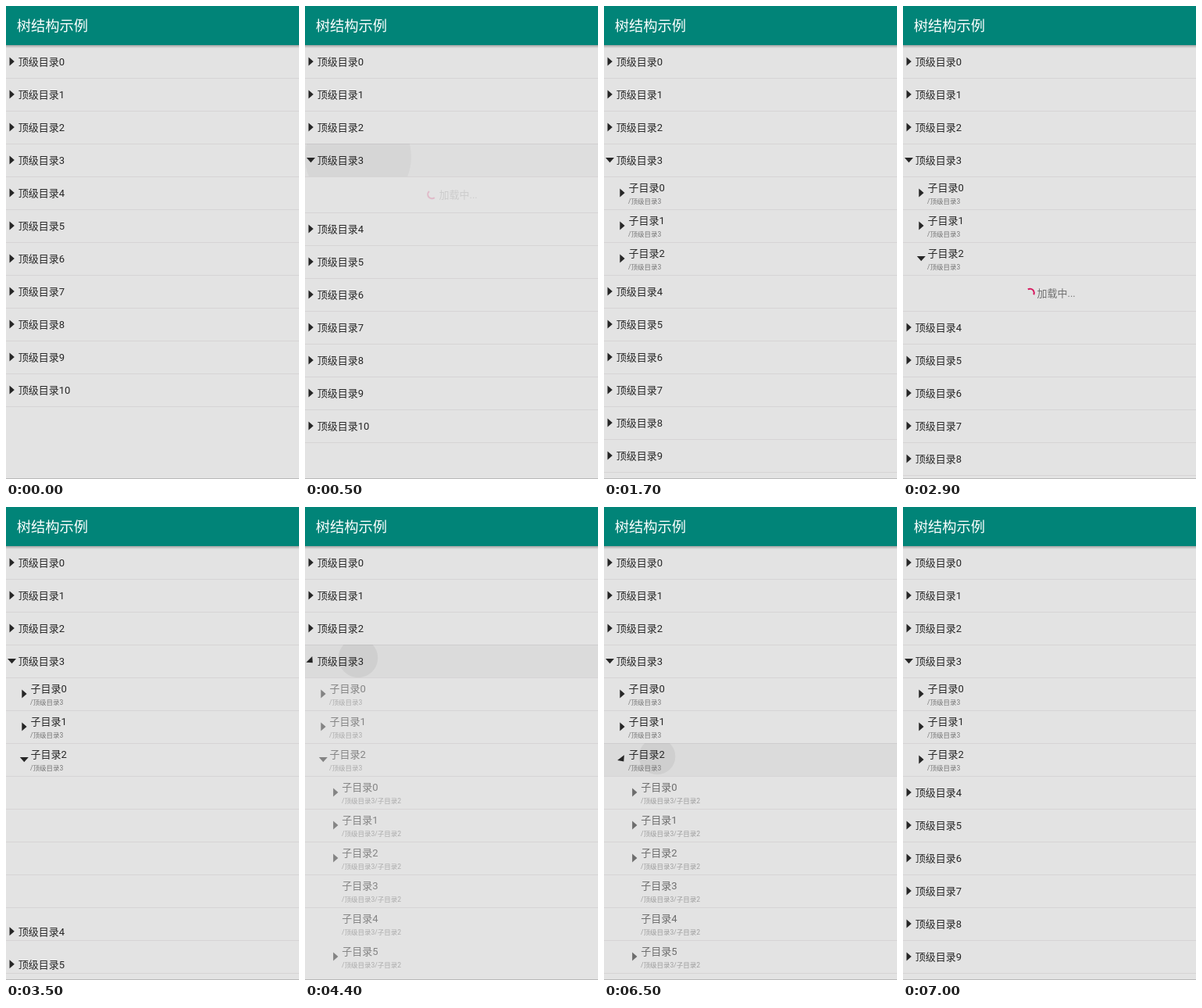
Recreate the animation shown at these times as an HTML page with a canvas. Size 375 px wide and 605 px high, loop 7.2 s.

```html
<!DOCTYPE html>
<html lang="zh-CN">
<head>
<meta charset="utf-8">
<title>树结构示例</title>
<style>
html, body { margin: 0; width: 100%; height: 100%; overflow: hidden; background: #e3e3e3; }
canvas { display: block; }
</style>
</head>
<body>
<canvas id="stage" width="375" height="605"></canvas>
<script>
const ctx = document.getElementById('stage').getContext('2d');
const W = 375, H = 605, BAR = 50, ROW = 42, LOAD_ROW = 46, LOOP = 7200, STEP = 100;
const FADE = 120, MOVE = 250, TURN = 120;
const FONT = 'Roboto, "Noto Sans CJK SC", "Noto Sans CJK", sans-serif';

const clamp = v => Math.max(0, Math.min(1, v));
const ease = v => (1 - Math.cos(Math.PI * clamp(v))) / 2;
const mix = (a, b, p) => a + (b - a) * p;

// Builds the visible rows, keyed by id, with their laid-out positions.
function layout({ open = false, kids = 0, kidOpen = false, subs = 0, loading = false }) {
  const rows = new Map();
  let y = BAR;
  const add = (key, row) => {
    const h = row.load ? LOAD_ROW : ROW;
    rows.set(key, { ...row, y, h });
    y += h;
  };
  for (let i = 0; i <= 10; i++) {
    add('top' + i, { depth: 0, title: '顶级目录' + i, open: open && i === 3 });
    if (i !== 3) continue;
    for (let k = 0; k < kids; k++)
      add('kid' + k, { depth: 1, title: '子目录' + k, path: '/顶级目录3', open: kidOpen && k === 2 });
    for (let s = 0; s < subs; s++)
      add('sub' + s, { depth: 2, title: '子目录' + s, path: '/顶级目录3/子目录2', leaf: s === 3 || s === 4 });
    if (loading) add('load', { load: true });
  }
  return rows;
}

const closed = layout({});
const loadTop = layout({ open: true, loading: true });
const withKids = layout({ open: true, kids: 3 });
const loadKid = layout({ open: true, kids: 3, kidOpen: true, loading: true });
const full = layout({ open: true, kids: 3, kidOpen: true, subs: 7 });

const changes = [
  { at: -1000, from: closed, to: closed },
  { at: 215, from: closed, to: loadTop, tap: 'top3' },
  { at: 1215, from: loadTop, to: withKids },
  { at: 2250, from: withKids, to: loadKid, tap: 'kid2' },
  { at: 3250, from: loadKid, to: full },
  { at: 4340, from: full, to: closed, tap: 'top3' },
  { at: 5150, from: closed, to: full },
  { at: 6450, from: full, to: withKids, tap: 'kid2' }
];

function text(str, x, y, size, color) {
  ctx.font = size + 'px ' + FONT;
  ctx.fillStyle = color;
  ctx.fillText(str, x, y);
}

function arrow(x, y, turn) {
  ctx.save();
  ctx.translate(x, y);
  ctx.rotate(turn * Math.PI / 2);
  ctx.fillStyle = '#262626';
  ctx.beginPath();
  ctx.moveTo(-3, -5.5);
  ctx.lineTo(3.3, 0);
  ctx.lineTo(-3, 5.5);
  ctx.fill();
  ctx.restore();
}

function spinner(x, y, t) {
  const first = t < 2000;
  const age = t - (first ? 100 : 2550);
  const phase = 2 * age / 1333;
  const base = (first ? -13 : -176) + age * 0.16;
  const tail = base + 270 * ease(phase - 1);
  const head = Math.max(base + 270 * ease(phase), tail + 10);
  ctx.strokeStyle = '#d81b60';
  ctx.lineWidth = 2;
  ctx.beginPath();
  ctx.arc(x, y, 5.3, tail * Math.PI / 180, head * Math.PI / 180);
  ctx.stroke();
}

function drawRow(row, y, alpha, turn, t) {
  if (alpha <= 0 || y > H) return;
  ctx.globalAlpha = alpha;
  if (row.load) {
    spinner(162.5, y + 23, t);
    text('加载中...', 171.5, y + 28, 13, '#707070');
  } else {
    const x = row.depth * 15.8;
    if (!row.leaf) arrow(7.5 + x, y + 21, turn);
    text(row.title, 15.7 + x, y + (row.path ? 18.5 : 26), 13, '#262626');
    if (row.path) text(row.path, 15.3 + x, y + 35.3, 8.5, '#757575');
  }
  ctx.globalAlpha = 1;
}

function ripple(y, age) {
  if (age < 0 || age > 500) return;
  const fade = 1 - clamp((age - 200) / 300);
  ctx.save();
  ctx.beginPath();
  ctx.rect(0, y, W, ROW);
  ctx.clip();
  ctx.fillStyle = `rgba(0,0,0,${0.035 * fade})`;
  ctx.fillRect(0, y, W, ROW);
  ctx.fillStyle = `rgba(0,0,0,${0.055 * fade})`;
  ctx.beginPath();
  ctx.arc(68, y + 17, Math.min(72, 10 + 0.19 * age), 0, 7);
  ctx.fill();
  ctx.restore();
}

function drawBar() {
  const shade = ctx.createLinearGradient(0, BAR, 0, BAR + 4);
  shade.addColorStop(0, 'rgba(0,0,0,.28)');
  shade.addColorStop(1, 'rgba(0,0,0,0)');
  ctx.fillStyle = shade;
  ctx.fillRect(0, BAR, W, 4);
  ctx.fillStyle = '#018478';
  ctx.fillRect(0, 0, W, BAR);
  text('树结构示例', 13.7, 31.7, 18.3, '#fff');
}

function draw(t) {
  const { at, from, to, tap } = changes.filter(c => c.at <= t).pop();
  const age = t - at;
  ctx.fillStyle = '#e3e3e3';
  ctx.fillRect(0, 0, W, H);

  // Dividers jump to the new layout at once; rows follow.
  ctx.fillStyle = '#d6d4d5';
  for (const row of to.values()) ctx.fillRect(0, row.y + row.h, W, 1);
  if (tap) ripple(to.get(tap).y, age + 20);

  // Removed rows fade out, kept rows move, then new rows fade in.
  const removed = [...from].filter(([key]) => !to.has(key));
  const moveAt = removed.length ? FADE : 0;
  const moved = ease((age - moveAt) / MOVE);
  const shown = ease((age - moveAt - MOVE) / FADE);
  for (const [, row] of removed) drawRow(row, row.y, 1 - ease(age / FADE), +row.open || 0, t);
  for (const [key, row] of to) {
    const old = from.get(key);
    const turn = mix(+(old || row).open || 0, +row.open || 0, clamp(age / TURN));
    drawRow(row, old ? mix(old.y, row.y, moved) : row.y, old ? 1 : shown, turn, t);
  }

  drawBar();
  ctx.fillStyle = '#b8b8b8';
  ctx.fillRect(0, H - 1, W, 1);
}

const start = performance.now();
function tick() {
  const t = (performance.now() - start + 8) % LOOP;
  draw(Math.floor(t / STEP) * STEP);
  requestAnimationFrame(tick);
}
tick();
</script>
</body>
</html>
```
